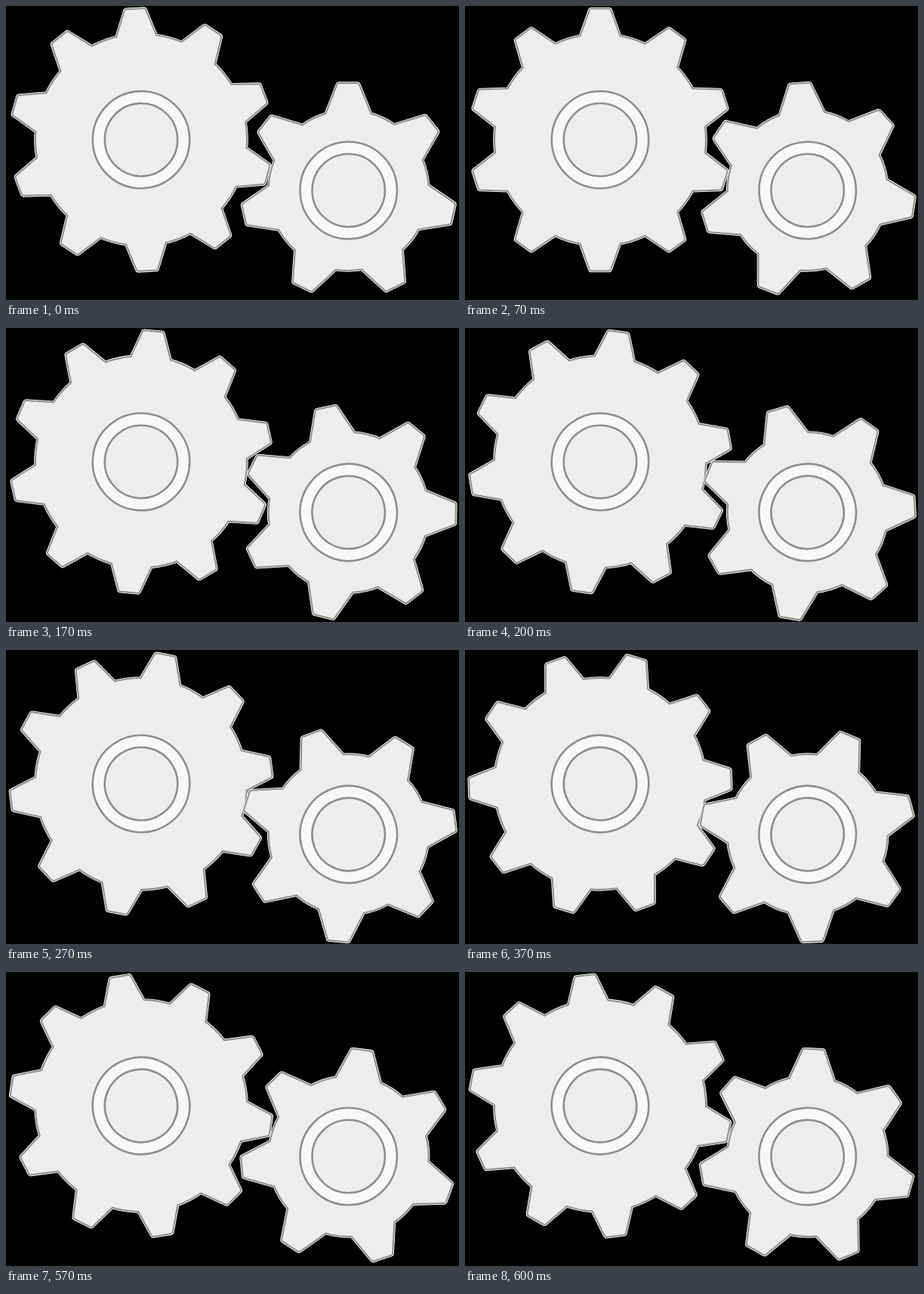
Write an HTML page with a canvas that moves like this. It is 600x389 px and loops after 0.67 s.

```html
<!DOCTYPE html>
<html lang="en">
<head>
<meta charset="utf-8">
<title>Gears</title>
<style>
  html, body { margin: 0; height: 100%; overflow: hidden; background: #000; }
  canvas { display: block; }
</style>
</head>
<body>
<canvas id="stage" width="600" height="389"></canvas>
<script>
const ctx = document.getElementById('stage').getContext('2d');
const LOOP = 670, LINE = '#8e8e8e';

// start and turn are in degrees, turn being the rotation per step
const big = { x: 179, y: 177, teeth: 10, root: 140, tip: 173.5, rootHalf: 26.5, tipHalf: 13.5, start: -8 / 3, turn: 8 / 3 };
const small = { x: 453.7, y: 244, teeth: 7, root: 106, tip: 142, rootHalf: 30, tipHalf: 14, start: -0.2, turn: -4 };

function disc(radius, fill) {
  ctx.beginPath();
  ctx.arc(0, 0, radius, 0, 2 * Math.PI);
  ctx.fillStyle = fill;
  ctx.fill();
  ctx.lineWidth = 2.6;
  ctx.stroke();
}

function outline({ teeth, root, tip, rootHalf, tipHalf }) {
  const pitch = 2 * Math.PI / teeth;
  const half = Math.asin(rootHalf / root);
  const top = -Math.PI / 2;
  ctx.beginPath();
  for (let i = 0; i < teeth; i++) {
    ctx.arc(0, 0, root, top - pitch + half, top - half);
    ctx.arcTo(-tipHalf, -tip, tipHalf, -tip, 3);
    ctx.arcTo(tipHalf, -tip, rootHalf, -root * Math.cos(half), 3);
    ctx.rotate(pitch);
  }
  ctx.closePath();
}

function drawGear(gear, step) {
  ctx.save();
  ctx.translate(gear.x, gear.y);
  ctx.rotate((gear.start + step * gear.turn) * Math.PI / 180);
  outline(gear);
  // pale fringe under the grey edge
  ctx.strokeStyle = '#fff';
  ctx.lineWidth = 3.6;
  ctx.stroke();
  ctx.fillStyle = '#ededed';
  ctx.fill();
  ctx.strokeStyle = LINE;
  ctx.lineWidth = 2;
  ctx.stroke();
  disc(64.2, '#f8f8f8');
  disc(48.2, '#ededed');
  ctx.restore();
}

// Steps alternate between 70 ms and 30 ms.
function draw(now) {
  const t = now % LOOP;
  const step = 2 * Math.floor(t / 100) + (t % 100 >= 70 ? 1 : 0);
  ctx.clearRect(0, 0, 600, 389);
  drawGear(big, step);
  drawGear(small, step);
}

const start = performance.now();
function tick() {
  draw(performance.now() - start);
  requestAnimationFrame(tick);
}
tick();
</script>
</body>
</html>
```
